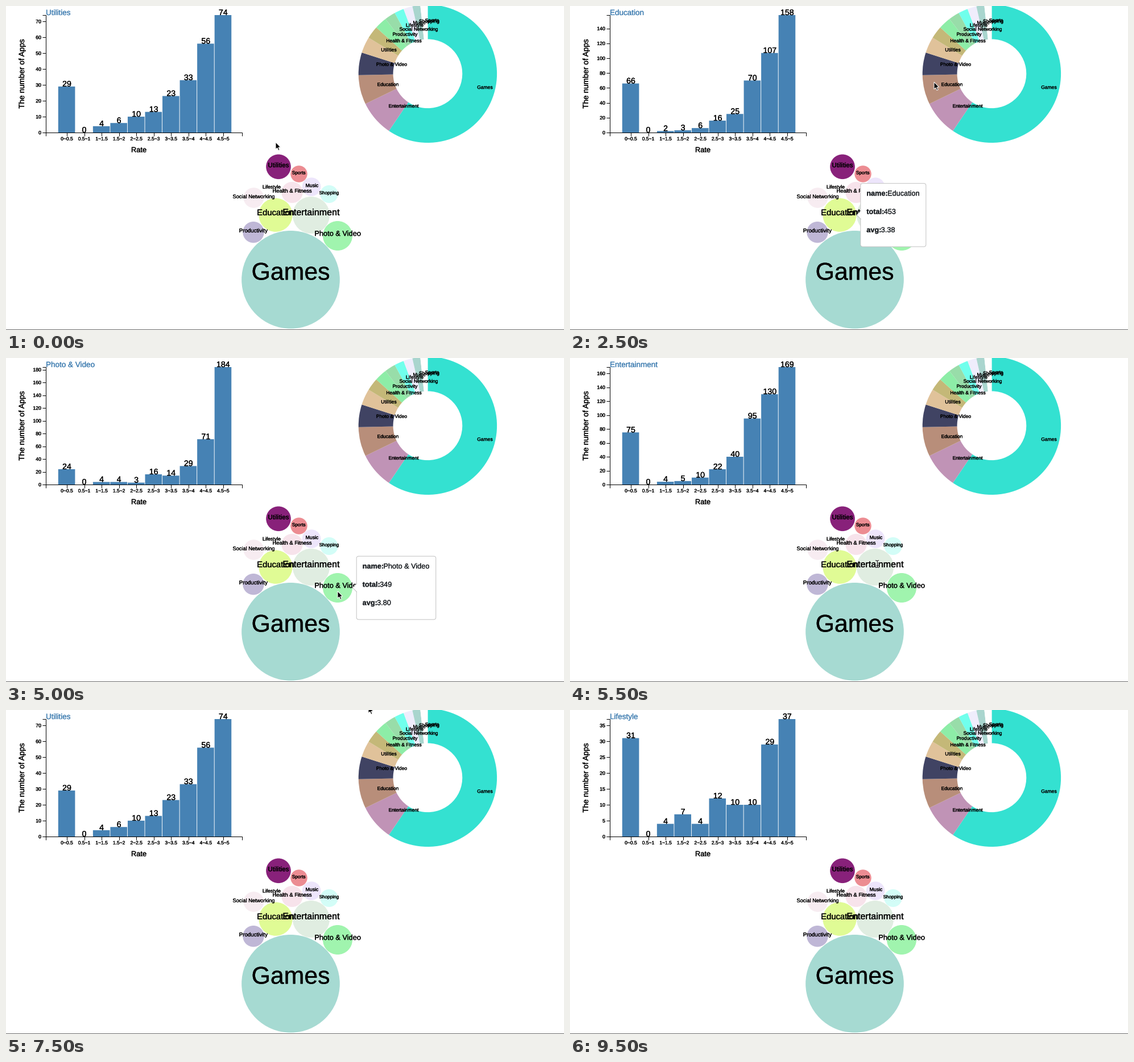
Animation of 981 by 571 pixels, one loop 10000 ms. Source, as a matplotlib script:

```python
import math
import matplotlib.pyplot as plt
from matplotlib.animation import FuncAnimation
from matplotlib.patches import Circle, FancyBboxPatch, Polygon, Rectangle, Wedge
from matplotlib.patheffects import withStroke

W, H, DPI = 981, 571, 64
PT = 72 / DPI  # points per pixel
STEP_MS = 500

plt.rcParams["font.family"] = "Liberation Sans"
plt.rcParams["text.hinting"] = "none"

# Ratings histogram of each category
RATINGS = {
    "Utilities": [29, 0, 4, 6, 10, 13, 23, 33, 56, 74],
    "Entertainment": [75, 0, 4, 5, 10, 22, 40, 95, 130, 169],
    "Education": [66, 0, 2, 3, 6, 16, 25, 70, 107, 158],
    "Photo & Video": [24, 0, 4, 4, 3, 16, 14, 29, 71, 184],
    "Games": [400, 1, 24, 35, 70, 160, 330, 560, 910, 1430],
    "Social Networking": [33, 0, 2, 3, 3, 6, 19, 26, 34, 41],
    "Music": [20, 0, 3, 2, 6, 14, 20, 26, 24, 28],
    "Sports": [13, 0, 4, 1, 10, 12, 14, 22, 17, 21],
    "Lifestyle": [31, 0, 4, 7, 4, 12, 10, 10, 29, 37],
}
AVERAGE = {"Entertainment": "3.42", "Education": "3.38", "Photo & Video": "3.80",
           "Music": "3.26", "Sports": "2.98"}

# name: (end angle, colour, label x, label y)
SLICES = {
    "Games": (214.1, "#34e1d1", 842, 143),
    "Entertainment": (244.1, "#c093b6", 699, 176),
    "Education": (268.8, "#b88e7a", 671.5, 138),
    "Photo & Video": (287.8, "#404363", 678, 102.5),
    "Utilities": (301.4, "#e0c29a", 673, 77),
    "Health & Fitness": (312, "#c4b878", 699.5, 61),
    "Productivity": (322.4, "#8deda7", 701.5, 49.5),
    "Social Networking": (331.6, "#98dda9", 725.5, 40.5),
    "Lifestyle": (339.6, "#70ffec", 718.5, 33.5),
    "Music": (347.2, "#efedfc", 726.5, 29),
    "Shopping": (353.8, "#a9d5ce", 744, 26.5),
    "Sports": (360, "#fefefe", 749, 25),
}

# name: (cx, cy, radius, colour, label x, label y, font size)
BUBBLES = {
    "Games": (500.5, 482.3, 86.3, "#a6dad2", 500.5, 467, 42.8),
    "Entertainment": (536.5, 368.5, 32.5, "#e0ede1", 536.5, 363, 16.1),
    "Education": (474, 368.3, 29.6, "#e0fb95", 474, 363.5, 14.8),
    "Photo & Video": (583, 405, 26, "#a0f4ae", 583, 400.5, 12.8),
    "Utilities": (479, 283.3, 21.8, "#88217a", 479, 280, 11.5),
    "Sports": (515, 296, 14.7, "#ec8c92", 514.8, 293.5, 8.2),
    "Health & Fitness": (503, 328.5, 18.6, "#f7e3eb", 503, 325.5, 9.4),
    "Music": (537, 318.7, 16.3, "#ede5fb", 538, 316, 8.7),
    "Shopping": (568, 331.5, 15.6, "#d3fdf7", 568, 329, 8.2),
    "Social Networking": (435.5, 338, 17.8, "#f7ecf1", 435.5, 335.5, 9.25),
    "Productivity": (435, 398.7, 18.7, "#bfb7d6", 435, 395.5, 9.7),
    "Lifestyle": (467, 321, 15, "#ffffff", 467, 318.5, 8.75),
}

# One step each: category, tooltip shown, pointer kind, pointer position
STEPS = [
    ("Utilities", False, "arrow", (474, 240)),
    ("Utilities", False, "arrow", (579, 211)),
    ("Utilities", False, "arrow", (670, 181)),
    ("Utilities", False, "arrow", (670, 181)),
    ("Entertainment", True, "arrow", (670, 181)),
    ("Education", True, "arrow", (640, 134)),
    ("Photo & Video", False, "arrow", (643, 103)),
    ("Photo & Video", False, "arrow", (559, 121)),
    ("Photo & Video", False, "arrow", (319, 451)),
    ("Games", False, "beam", (474, 481)),
    ("Photo & Video", True, "arrow", (583, 411)),
    ("Entertainment", False, "beam", (540, 363)),
    ("Entertainment", True, "arrow", (545, 385)),
    ("Social Networking", False, "beam", (438, 329.5)),
    ("Music", False, "arrow", (565, 302)),
    ("Utilities", False, "arrow", (637, -7)),
    ("Music", True, "arrow", (710, 14)),
    ("Sports", True, "arrow", (710, 14)),
    ("Lifestyle", False, "arrow", (522, 113)),
    ("Lifestyle", False, None, None),
]

fig = plt.figure(figsize=(W / DPI, H / DPI), dpi=DPI, facecolor="white")
ax = fig.add_axes([0, 0, 1, 1])


def text(x, y, s, size, ha="center", color="black", z=3, **kw):
    # The hairline stroke gives the slightly heavy look of screen text.
    return ax.text(x, y, s, fontsize=size * PT, ha=ha, va="baseline",
                   color=color, zorder=z,
                   path_effects=[withStroke(linewidth=0.25 * PT, foreground=color)], **kw)


def label(x, y, s, size, ha="center"):
    """Text whose capitals are centred on y."""
    return text(x, y + 0.36 * size, s, size, ha)


def line(xs, ys, color="black", width=1, z=2):
    ax.plot(xs, ys, color=color, lw=width * PT, zorder=z,
            solid_capstyle="butt", solid_joinstyle="miter")


def tick_step(top):
    """Nice step giving about ten ticks."""
    raw = top / 10
    power = 10 ** math.floor(math.log10(raw))
    ratio = raw / power
    factor = (10 if ratio >= math.sqrt(50) else 5 if ratio >= math.sqrt(10)
              else 2 if ratio >= math.sqrt(2) else 1)
    return max(1, round(factor * power))


def draw_histogram(name):
    left, right, base, height = 70, 415, 223, 207
    values = RATINGS[name]
    top = max(values)
    for k, v in enumerate(values):
        x, h = 91.8 + 30.54 * k, height * v / top
        ax.add_patch(Rectangle((x, base - h), 29.6, h, color="#4682b4", lw=0, snap=False))
        text(x + 15.2, base - h, str(v), 14.2)
        line([x + 15.2, x + 15.2], [base, base + 6])
        label(x + 15.2, 233.7, f"{k / 2:g}~{(k + 1) / 2:g}", 8.5)
    line([left, left, right, right], [base + 6, base, base, base + 6])
    line([left - 6, left, left, left - 6], [base - height, base - height, base, base])
    for v in range(0, top + 1, tick_step(top)):
        y = base - height * v / top
        line([left - 6, left], [y, y])
        label(62, y, f"{v:,}", 8.7, "right")
    text(left, 16, name, 13.5, "left", "#4682b4")
    label(233.5, 253, "Rate", 12.9)
    text(32, 119.5, "The number of Apps", 13.6, rotation=90, rotation_mode="anchor")


def draw_donut():
    start = 0
    for name, (end, color, x, y) in SLICES.items():
        ax.add_patch(Wedge((741.4, 119.3), 121.7, start - 90, end - 90,
                           width=60.85, color=color, lw=0))
        label(x, y, name, 8.5)
        start = end


def draw_bubbles():
    for name, (cx, cy, r, color, x, y, size) in BUBBLES.items():
        ax.add_patch(Circle((cx, cy), r, color=color, lw=0))
        label(x, y, name, size)


def draw_tooltip(name):
    cx, cy, r = BUBBLES[name][:3]
    tip = cx + r + 0.5
    left, ink, right = tip + 6.7, "#212529", 0
    rows = [("name:", name), ("total:", str(sum(RATINGS[name]))), ("avg:", AVERAGE[name])]
    for k, (key, value) in enumerate(rows):
        y = cy - 34 + 32.2 * k
        head = text(left + 10.5, y, key, 12.7, "left", ink, 7, weight="bold")
        x = head.get_window_extent().x1 - 0.8
        body = text(x, y, value, 12.7, "left", ink, 7)
        right = max(right, body.get_window_extent().x1)
    style = dict(fc="white", ec="#c2c2c2", lw=PT)
    ax.add_patch(FancyBboxPatch((left, cy - 55.7), right + 11 - left, 111.6, zorder=5,
                                boxstyle="round,pad=0,rounding_size=4", **style))
    ax.add_patch(Polygon([(left + 0.8, cy - 7.5), (tip, cy), (left + 0.8, cy + 7.5)],
                         closed=False, zorder=6, **style))


def draw_pointer(kind, pos):
    if kind is None:
        return
    x, y = pos
    if kind == "arrow":
        shape = [(0, 0), (0, 12.6), (2.9, 10), (4.9, 14.6), (7, 13.7), (5, 9.2), (8.8, 9)]
        ax.add_patch(Polygon([(x + a, y + b) for a, b in shape], fc="black",
                             ec="white", lw=PT, zorder=9))
        return
    for color, width in (("white", 2.6), ("black", 1.1)):
        line([x, x], [y - 5, y + 5], color, width, 9)
        for s in (-1, 1):
            line([x - 3, x - 1, x, x + 1, x + 3],
                 [y + s * d for d in (6.3, 6, 5, 6, 6.3)], color, width, 9)
        line([x - 2, x + 2], [y + 2, y + 2], color, width, 9)


def draw(i):
    name, tooltip, kind, pos = STEPS[i % len(STEPS)]
    ax.clear()
    ax.set_xlim(0, W)
    ax.set_ylim(H, 0)
    ax.set_autoscale_on(False)
    ax.axis("off")
    draw_histogram(name)
    draw_donut()
    draw_bubbles()
    ax.add_patch(Rectangle((0, H - 1), W, 1, color="#6a6a6a", lw=0))
    if tooltip:
        draw_tooltip(name)
    draw_pointer(kind, pos)
    return []


anim = FuncAnimation(fig, draw, frames=len(STEPS), init_func=lambda: [],
                     interval=STEP_MS, repeat=True, repeat_delay=0, blit=False)
plt.show()
```
